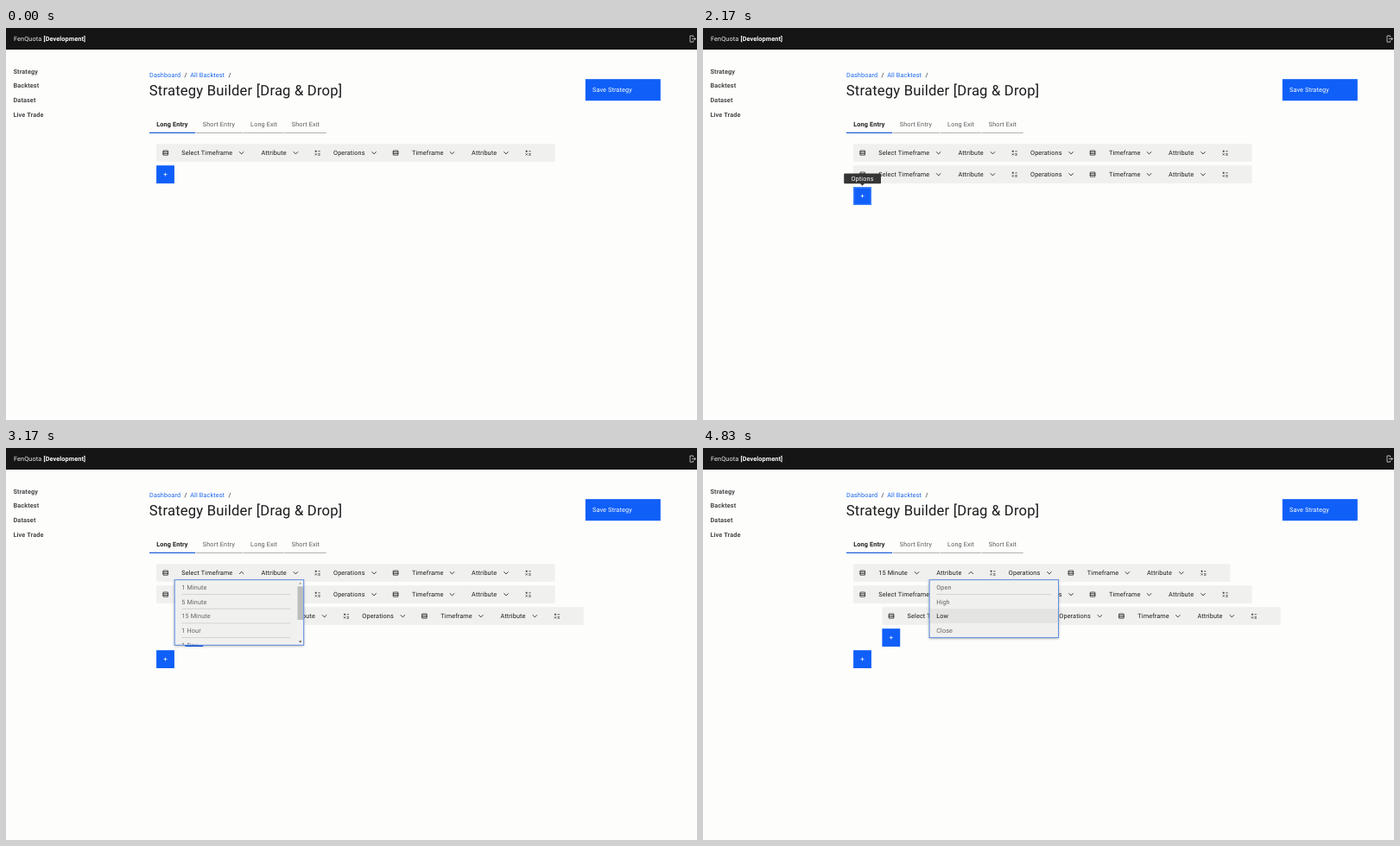
Animation, 800 px wide and 454 px high, one loop 5080 ms. Source, as an HTML page:

```html
<!DOCTYPE html>
<html lang="en">
<head>
<meta charset="utf-8">
<title>Strategy Builder</title>
<style>
html, body { margin: 0; width: 100%; height: 100%; overflow: hidden; background: #fdfdfc; }
svg { display: block; width: 100vw; height: 100vh; }
text {
  font: 400 7.29px Roboto, Inter, sans-serif;
  letter-spacing: .12px; white-space: pre; text-rendering: geometricPrecision;
}
text.bold { font-weight: 600; }
text.title { font-size: 16.67px; letter-spacing: .17px; }
.float { filter: drop-shadow(0 1px 1.4px rgba(0, 0, 0, .32)); }
.icon { fill: none; stroke: #262626; stroke-width: .75; }
</style>
</head>
<body>
<svg viewBox="0 0 800 454" preserveAspectRatio="none">
  <g id="page"></g>
  <g id="app"></g>
</svg>
<script>
const INK = '#1c1c1c', MUTED = '#646464', BLUE = '#0f5ff8', FIELD = '#f0f0ef', HOVER = '#e4e4e3';
const LOOP = 5080, UNIT = 20.83, STEP = 25, LEFT = 174.1, TOP = 134.3;

const rect = (x, y, w, h, fill, more = '') =>
  `<rect x="${x}" y="${y}" width="${w}" height="${h}" fill="${fill}" ${more}/>`;
// y is the middle of the capitals
const label = (x, y, str, fill = INK, more = '') =>
  `<text x="${x}" y="${y + 2.6}" fill="${fill}" ${more}>${str.replace('&', '&amp;')}</text>`;
const path = (x, y, d, more = '') =>
  `<path class="icon" transform="translate(${x} ${y})" d="${d}" ${more}/>`;
const line = (x1, x2, y, color, width) =>
  `<path d="M${x1} ${y}H${x2}" stroke="${color}" stroke-width="${width}"/>`;

const chevron = (x, y, up) => path(x, y, up ? 'M-2.6 1.3L0 -1.3L2.6 1.3' : 'M-2.6 -1.3L0 1.3L2.6 -1.3',
  'style="stroke-width:.9"');
const sheet = (x, y) => path(x, y, 'M-2.7 -2.6H2.7V2.6H-2.7ZM-3.5 -.9H3.5M-3.5 .9H3.5');
const calc = (x, y) => path(x, y,
  'M-3 -1.8H-.6M-1.8 -3V-.6M.8 -1.8H3.1M-2.8 .8L-.8 2.8M-.8 .8L-2.8 2.8M.8 1.1H3.1M.8 2.6H3.1');

function drawPage() {
  const bold = 'class="bold"';
  let s = rect(0, 0, 800, 25, '#151515')
    + label(9, 12.5, 'FenQuota', '#f0f0f0')
    + label(43.5, 12.5, '[Development]', '#fff', bold)
    + path(795, 12.6, 'M.6 -3.6H-3V3.6H.6V2M.6 -2V-3.6M-.9 0H3.4M1.7 -1.7L3.4 0L1.7 1.7', 'style="stroke:#e8e8e8"');
  ['Strategy', 'Backtest', 'Dataset', 'Live Trade'].forEach((name, i) => {
    s += label(8.5, 49.9 + i * 16.67, name, '#484848', bold);
  });
  s += label(166, 54.6, 'Dashboard', '#1b67ee') + label(206.5, 54.6, '/')
    + label(213.2, 54.6, 'All Backtest', '#1b67ee') + label(257.5, 54.6, '/')
    + label(165.8, 75.2, 'Strategy Builder [Drag & Drop]', INK, 'class="title"')
    + rect(670.8, 59.2, 87, 25, BLUE) + label(679, 71.8, 'Save Strategy', '#fff');
  s += label(174.3, 111.6, 'Long Entry', INK, bold) + line(166, 219, 121.4, '#1f62d8', 1.2);
  [['Short Entry', 219.5, 274.2], ['Long Exit', 274.8, 321.8], ['Short Exit', 322.4, 370.8]].forEach(([name, a, b]) => {
    s += label(a + 8.3, 111.6, name, '#5c5c5c') + line(a, b, 121.5, '#a0a0a0', .8);
  });
  return s;
}

function row(x, y, { first = 'Select Timeframe', open = '', hover = '' } = {}) {
  const cut = first === 'Select Timeframe' ? 0 : 25.2;
  const m = y + 10.3, at = dx => x + dx - cut;
  let s = rect(x, y, 461.4 - cut, UNIT - .3, FIELD);
  if (hover === 'time') s += rect(x + 20.8, y + .5, 92 - cut, UNIT - 1.5, HOVER);
  if (hover === 'attr') s += rect(at(113), y + .5, 63, UNIT - 1.5, HOVER);
  s += sheet(x + 10.6, m) + label(x + 29.2, m, first) + chevron(at(98.6), m, open === 'time');
  [['Attribute', 121.4, 161.3], ['Operations', 204.9, 252], ['Timeframe', 295.9, 342.4], ['Attribute', 365, 404.9]]
    .forEach(([name, a, b], i) => {
      s += label(at(a), m, name) + chevron(at(b), m, open === 'attr' && i === 0);
    });
  return s + calc(at(186.5), m) + sheet(at(277), m) + calc(at(430.4), m);
}

function plus(x, y, focus) {
  const c = x + 10.4, m = y + 10.4;
  return rect(x, y, UNIT, UNIT, BLUE)
    + (focus ? rect(x + .8, y + .8, UNIT - 1.6, UNIT - 1.6, 'none', 'stroke="#5a94fb" stroke-width=".8"') : '')
    + path(c, m, 'M-2 0H2M0 -2V2', 'style="stroke:#fff"');
}

function tooltip(x, y) {
  const c = x + 10.4;
  return rect(c - 21.3, y - 15.7, 42.8, 11.7, '#353535', 'rx="1"')
    + `<path d="M${c - 2.4} ${y - 4.1}h4.8l-2.4 2.6z" fill="#353535"/>`
    + label(c, y - 9.8, 'Options', '#fff', 'text-anchor="middle"');
}

function menu(x, y, hot) {
  let s = `<g class="float">${rect(x, y, 83.3, UNIT * 4, FIELD)}</g>`;
  ['Add Filter', 'Add Sub-Filter', 'Copy', 'Disable'].forEach((name, i) => {
    const top = y + i * UNIT;
    if (i === hot && i) s += rect(x, top, 83.3, UNIT, HOVER);
    if (i === 3) s += line(x, x + 83.3, top, '#cfcfcf', .8);
    if (i === 0) s += rect(x + .5, top + .5, 82.3, UNIT - 1, 'none', 'stroke="#2f6fe0"');
    s += label(x + 8.6, top + 10.3, name, i === hot && i ? INK : MUTED);
  });
  return s;
}

function dropdown(x, names, height, hot, scroll) {
  const y = 152.7, w = 149.8, h = 16.67;
  let s = `<g class="float">${rect(x, y, w, height, FIELD)}</g><g clip-path="url(#list)">`
    + `<clipPath id="list">${rect(x, y, w, height - .5, '#000')}</clipPath>`;
  names.forEach((name, i) => {
    const top = y + .2 + i * h;
    if (i === hot) s += rect(x, top, w - (scroll ? 7.5 : 0), h, HOVER);
    if (i && i !== hot && i - 1 !== hot) {
      s += line(x + 8.4, x + (scroll ? 134.5 : 141.5), top, '#c6c6c6', .7);
    }
    s += label(x + 8.4, top + 8.4, name, i === hot ? INK : MUTED);
  });
  s += '</g>';
  if (scroll) {
    const left = x + w - 7.6, mid = left + 3.6;
    s += rect(left, y, 7.6, height, '#f1f1f1') + rect(left + .4, y + 7.6, 6.6, 38.8, '#bdbdbd')
      + `<path d="M${mid - 1.8} ${y + 4.8}l1.8 -2 1.8 2z" fill="#a5a5a5"/>`
      + `<path d="M${mid - 1.8} ${y + height - 4.8}l1.8 2 1.8 -2z" fill="#444"/>`;
  }
  return s + rect(x + .3, y, w - .3, height, 'none', 'stroke="#4d83e0" stroke-width=".9"');
}

const TIMES = ['1 Minute', '5 Minute', '15 Minute', '1 Hour', '1 Day'];
const PRICES = ['Open', 'High', 'Low', 'Close'];

// Each step changes only the listed parts of the state.
const START = { rows: 1, sub: false, tip: false, focus: false, menu: -1, list: '', hot: -1, hover: '', subHover: '', first: undefined };
const STEPS = [
  [0, {}],
  [1170, { tip: true }],
  [1250, { tip: false, menu: 0 }],
  [1750, { menu: -1, rows: 2, tip: true, focus: true }],
  [2250, { tip: false, focus: false, menu: 0 }],
  [2420, { menu: 1 }],
  [2750, { menu: -1, sub: true, tip: true, focus: true }],
  [2920, { tip: false, focus: false }],
  [3000, { hover: 'time' }],
  [3080, { hover: '', list: 'time' }],
  [3250, { hot: 0 }],
  [3330, { hot: 1 }],
  [3500, { hot: 2 }],
  [3670, { list: '', hot: -1, first: '15 Minute', subHover: 'time' }],
  [3920, { subHover: '' }],
  [4000, { hover: 'attr' }],
  [4080, { hover: '', list: 'attr' }],
  [4250, { hot: 0 }],
  [4330, { hot: 1 }],
  [4420, { hot: 2 }]
];
let last = START;
const states = STEPS.map(([at, change]) => [at, last = { ...last, ...change }]);

function drawApp(st) {
  let s = row(LEFT, TOP, { first: st.first, open: st.list, hover: st.hover });
  let y = TOP + STEP;
  if (st.rows > 1) { s += row(LEFT, y); y += STEP; }
  if (st.sub) {
    const x = LEFT + 33.3;
    s += row(x, y, { hover: st.subHover }) + plus(x, y + STEP - .1);
    y += 2 * STEP;
  }
  y -= .1;
  s += plus(LEFT, y, st.focus);
  if (st.tip) s += tooltip(LEFT, y);
  if (st.menu >= 0) s += menu(LEFT, y + UNIT, st.menu);
  if (st.list === 'time') s += dropdown(194.9, TIMES, 75.6, st.hot, true);
  if (st.list === 'attr') s += dropdown(261.8, PRICES, 67, st.hot, false);
  return s;
}

const app = document.getElementById('app');
document.getElementById('page').innerHTML = drawPage();
const start = performance.now();
let shown = -1;

function tick(now) {
  const t = Math.max(0, now - start) % LOOP;
  const i = states.filter(([at]) => at <= t).length - 1;
  if (i !== shown) {
    shown = i;
    app.innerHTML = drawApp(states[i][1]);
  }
  requestAnimationFrame(tick);
}
tick(start);
</script>
</body>
</html>
```
